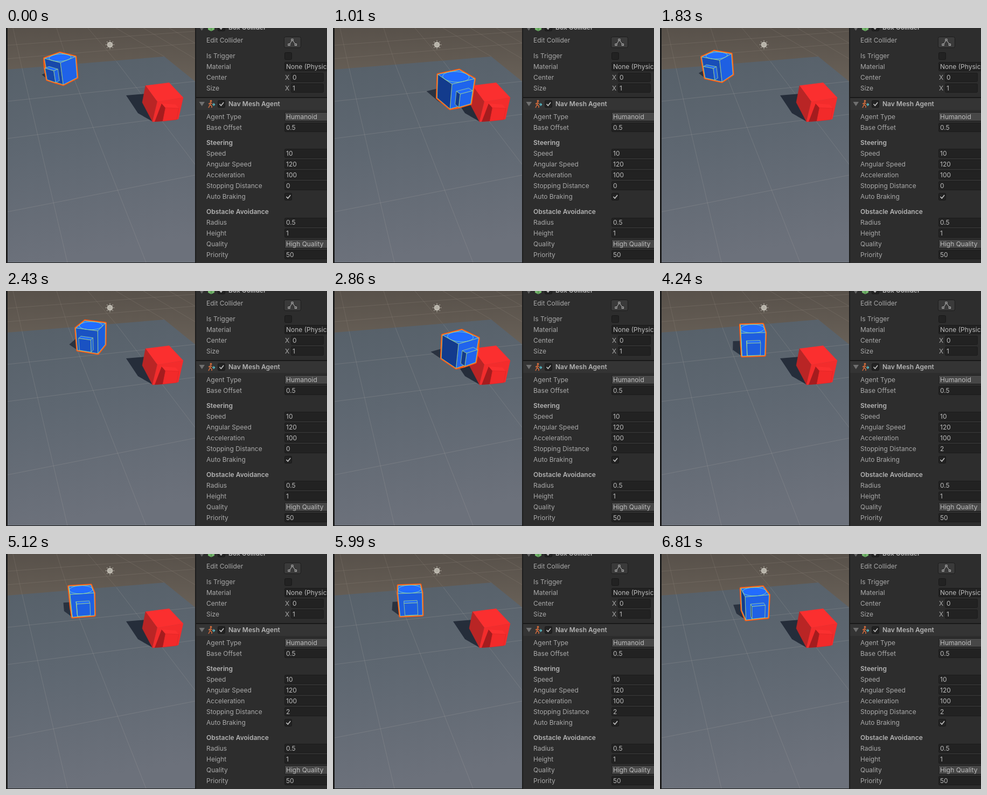
An HTML page that plays this animation: 596x436 px, repeating every 7270 ms.

```html
<!DOCTYPE html>
<html lang="en">
<head>
<meta charset="utf-8">
<title>Nav Mesh Agent stopping distance</title>
<style>
  html, body { margin: 0; width: 100%; height: 100%; overflow: hidden; background: #2d2d2d; }
  svg { display: block; width: 596px; height: 436px; }
  text { font: 12px Inter, sans-serif; fill: #a9a9a9; white-space: pre; }
  .bold { font-weight: 600; fill: #b4b4b4; }
  .value { fill: #bdbdbd; }
</style>
</head>
<body>
<svg viewBox="0 0 596 436" xmlns="http://www.w3.org/2000/svg">
  <defs>
    <linearGradient id="sky" x1="0" y1="0" x2="0" y2="1">
      <stop offset="0" stop-color="#58514a"/><stop offset="1" stop-color="#6a6259"/>
    </linearGradient>
    <linearGradient id="floor" x1="0" y1="0" x2=".15" y2="1">
      <stop offset="0" stop-color="#566069"/><stop offset=".45" stop-color="#5e6771"/>
      <stop offset="1" stop-color="#6c717b"/>
    </linearGradient>
    <clipPath id="view"><rect x="3" y="0" width="348" height="435"/></clipPath>
  </defs>

  <rect width="596" height="436" fill="#1d1d1d"/>
  <g clip-path="url(#view)">
    <rect x="3" width="348" height="110" fill="url(#sky)"/>
    <path d="M3 32L351 6M3 57L351 28M13 0L30 76M94 0L116 68M152 0L205 62M204 0L294 53M255 0L351 57M303 0L351 28"
          fill="none" stroke="#a39c90" stroke-opacity=".2"/>
    <path d="M3 77L294 53L351 99V435H3Z" fill="url(#floor)"/>
    <path d="M3 136L351 99M3 205L351 160M3 341L351 273M30 75L114 435M116 68L260 435M205 62L351 253"
          fill="none" stroke="#b4b0ac" stroke-opacity=".22"/>
    <g id="sun" stroke="#b0aca2" stroke-width="1.3">
      <circle cx="193" cy="31" r="4.600" fill="#b5b1a7" stroke="#d0ccc2"/>
    </g>
    <path d="M223 125L260 122L273 174L245 158Z" fill="#252d3a"/>
    <path id="shadow" fill="#2a323f"/>
    <g stroke-width=".5" stroke-linejoin="round">
      <path d="M259 107L303 101.500L329 129L281 137Z" fill="#fb2f2f" stroke="#fb2f2f"/>
      <path d="M259 107L281 137L272 174L253 138Z" fill="#b92525" stroke="#b92525"/>
      <path d="M281 137L329 129L320 169L272 174Z" fill="#f32c2c" stroke="#f32c2c"/>
      <path d="M289 140L296 148L291 173L276 174Z" fill="#a51c1e"/>
      <path d="M289 140L315 142L321 149L296 148Z" fill="#fb3030"/>
      <path d="M296 148L321 149L317 170L291 173Z" fill="#f22a2a" stroke="#d32424"/>
    </g>
    <path id="outline" fill="#ff5a14" stroke="#ff5a14" stroke-width="4.600" stroke-linejoin="round"/>
    <g id="agent" stroke="#a4d98e" stroke-width=".8" stroke-linejoin="round"></g>
    <path id="ring" fill="none" stroke="#8fe0b0" stroke-width=".8"/>
  </g>

  <rect x="353" width="243" height="436" fill="#2d2d2d"/>
  <g id="panel"></g>
</svg>

<script>
const $ = id => document.getElementById(id);
const rad = deg => deg * Math.PI / 180;

/* Inspector */
const rows = [];
const text = (x, y, s, cls = '') => rows.push(`<text class="${cls}" x="${x}" y="${y + 4.3}">${s}</text>`);
const rect = (x, y, w, h, fill, stroke = 'none', r = 2) =>
  rows.push(`<rect x="${x}" y="${y}" width="${w}" height="${h}" rx="${r}" fill="${fill}" stroke="${stroke}"/>`);
const path = (d, fill, stroke = 'none', w = 1) =>
  rows.push(`<path d="${d}" fill="${fill}" stroke="${stroke}" stroke-width="${w}"/>`);

function field(y, s, x = 517, w = 90, fill = '#222222') {
  rect(x + .5, y - 8.5, w - 1, 16, fill, '#1b1b1b');
  text(x + 3, y, s, 'value');
}
function checkbox(x, y, on) {
  rect(x + .5, y - 6.5, 13, 13, '#222222', '#181818');
  if (on) path(`M${x + 3.5} ${y}l2.8 3l4.8 -6`, 'none', '#c4c4c4', 1.6);
}
const label = (y, s) => text(372, y, s);

path('M358 -3h11l-5.5 8z', '#676767');
path('M375 -3L381 0L387 -3V3L381 6L375 3Z', '#74b56c');
path('M381 0V6', 'none', '#3f7a3b');
checkbox(393, -1, true);
text(413, -1, 'Box Collider', 'bold');

label(23, 'Edit Collider');
rect(516.5, 16.5, 31, 20, '#3a3a3a', '#1c1c1c', 3);
path('M526 31L531.5 22L538 31', 'none', '#b8b8b8');
for (const [x, y] of [[524, 29.5], [530, 20.5], [536.5, 29.5]]) rect(x, y, 3, 3, '#3a3a3a', '#b8b8b8', 0);
label(52, 'Is Trigger');
checkbox(517, 52, false);
label(72, 'Material');
field(72, 'None (Physic');
for (const [y, name, v] of [[92, 'Center', 0], [112, 'Size', 1]]) {
  label(y, name);
  text(518, y, 'X');
  field(y, v, 529, 61);
}

rect(353, 128, 243, 2, '#191919', 'none', 0);
rect(353, 130, 243, 22, '#343434', 'none', 0);
path('M358.5 137h10.5l-5.25 8z', '#707070');
rows.push('<circle cx="380.5" cy="135.5" r="1.9" fill="#cf6a3c"/>');
path('M380 138L379 142L382 144.5V148M379 142L376 148M376 141L380 138.5L383 141', 'none', '#cf6a3c', 1.6);
path('M383 142h4m-2 -2.5l2.5 2.5l-2.5 2.5', 'none', '#58b9c4', 1.4);
checkbox(393, 141, true);
text(413, 141, 'Nav Mesh Agent', 'bold');

const settings = [
  [165, 'Agent Type', 'Humanoid', 1], [185, 'Base Offset', '0.5'],
  [233, 'Speed', '10'], [253, 'Angular Speed', '120'], [273, 'Acceleration', '100'],
  [361, 'Radius', '0.5'], [381, 'Height', '1'], [401, 'Quality', 'High Quality', 1], [421, 'Priority', '50']
];
for (const [y, name, v, menu] of settings) {
  label(y, name);
  field(y, v, 517, 90, menu ? '#474747' : undefined);
}
text(372, 213, 'Steering', 'bold');
text(372, 341, 'Obstacle Avoidance', 'bold');
label(313, 'Auto Braking');
checkbox(517, 313, true);
rows.push('<text id="stopLabel" x="372" y="297.3">Stopping Distance</text>',
  '<rect id="stopBox" x="517.5" y="284.5" width="89" height="16" rx="2" fill="#222222"/>',
  '<text id="stopValue" class="value" x="520" y="297.3"></text>');
$('panel').innerHTML = rows.join('');

$('sun').innerHTML += Array.from({ length: 8 }, (_, i) => {
  const c = Math.cos(i * Math.PI / 4), s = Math.sin(i * Math.PI / 4);
  return `<path d="M${193 + 6.2 * c} ${31 + 6.2 * s}L${193 + 8.2 * c} ${31 + 8.2 * s}"/>`;
}).join('');

/* Camera: u is right, w is away from the viewer, y is up */
const F = 378, CX = 177, CY = 218, HIGH = 4.1;
const C = Math.cos(rad(41)), S = Math.sin(rad(41));
const SIDE = 1;

function project([u, w, y]) {
  const z = w * C + (HIGH - y) * S;
  return [CX + F * u / z, CY + F * ((HIGH - y) * C - w * S) / z];
}
function unproject(x, y, level) {
  const h = HIGH - level, z = h / (C * (y - CY) / F + S);
  return [(x - CX) / F * z, (z - h * S) / C];
}
const toPath = pts => 'M' + pts.map(p => p.map(v => v.toFixed(2)).join(' ')).join('L') + 'Z';

const cross = (a, b, c) => (b[0] - a[0]) * (c[1] - a[1]) - (b[1] - a[1]) * (c[0] - a[0]);
function hull(points) {
  const half = pts => {
    const out = [];
    for (const p of pts) {
      while (out.length > 1 && cross(out[out.length - 2], out[out.length - 1], p) <= 0) out.pop();
      out.push(p);
    }
    return out.slice(0, -1);
  };
  const sorted = [...points].sort((a, b) => a[0] - b[0] || a[1] - b[1]);
  return [...half(sorted), ...half(sorted.reverse())];
}

/* Corners of an upright box in the agent's own axes */
function box(place, half, z0, z1, y0, y1) {
  const ring = [[-half, z1], [half, z1], [half, z0], [-half, z0]];
  return [y0, y1].map(y => ring.map(([x, z]) => place(x, z, y)));
}
function shade(light) {
  return `rgb(${[34, 108, 255].map(v => Math.round(v * light)).join()})`;
}
function faces([low, high], yaw) {
  const lo = low.map(project), hi = high.map(project);
  const list = [[[hi[3], hi[2], hi[1], hi[0]], 1]];
  for (let k = 0; k < 4; k++) {
    const n = (k + 1) % 4, a = rad(yaw + 90 * k);
    const lit = Math.max(0, .6 * Math.sin(a) + .8 * Math.cos(a));
    list.push([[hi[k], hi[n], lo[n], lo[k]], .55 + .38 * lit]);
  }
  return list.filter(([q]) => cross(q[0], q[1], q[2]) > 0)
    .map(([q, light]) => `<path d="${toPath(q)}" fill="${shade(light)}"/>`).join('');
}

function drawAgent([x, y, yaw]) {
  const [u, w] = unproject(x, y, SIDE / 2);
  const c = Math.cos(rad(yaw)), s = Math.sin(rad(yaw)), h = SIDE / 2;
  const place = (px, pz, py) => [u + c * px + s * pz, w + s * px - c * pz, py];
  const body = box(place, h, -h, h, 0, SIDE);
  const nose = box(place, .28, h, h + .25, .14, .68);

  const cast = body.flat().map(([a, b, t]) => project([a - .45 * t, b + .62 * t, 0]));
  $('shadow').setAttribute('d', toPath(hull(cast)));
  $('outline').setAttribute('d', toPath(hull([...body.flat(), ...nose.flat()].map(project))));
  $('agent').innerHTML = faces(body, yaw) + faces(nose, yaw);
  const circle = Array.from({ length: 28 }, (_, i) => {
    const a = i * Math.PI / 14;
    return project(place(h * Math.cos(a), h * Math.sin(a), SIDE));
  });
  $('ring').setAttribute('d', toPath(circle));
}

/* Moves: first change, last change, steps, [x, y, yaw] reached */
const LOOP = 7270, CUT = 3220;
const home = [103, 75, -35];
const moves = [
  [460, 1010, 9, [226, 113, 28]],
  [1410, 1960, 9, [100, 68, -42]],
  [2230, 2860, 10, [234, 107, 33]],
  [CUT, CUT, 1, [88, 66, -36]],
  [3480, 3910, 7, [177, 92, 8]],
  [4240, 4520, 5, [110, 78, -10]],
  [4980, 5320, 6, [178, 98, 30]],
  [5850, 6130, 5, [121, 78, -10]],
  [6540, 6810, 5, [175.5, 91, 13]]
];

function poseAt(t) {
  let from = home;
  for (const [start, end, steps, to] of moves) {
    if (t < start) break;
    if (t < end) {
      const p = (Math.floor((t - start) * (steps - 1) / (end - start) + .02) + 1) / steps;
      const q = Math.min(1, p) ** (steps > 6 ? .65 : 1.1);
      const e = q * q * (3 - 2 * q);
      return from.map((v, i) => v + (to[i] - v) * (i < 2 ? e : p));
    }
    from = to;
  }
  return from;
}

function render(t) {
  drawAgent(poseAt(t));
  const focused = t >= CUT && t < 3480;
  $('stopValue').textContent = t < CUT ? '0' : '2';
  $('stopLabel').style.fill = focused ? '#7ba9ec' : '';
  $('stopBox').setAttribute('stroke', focused ? '#3a79bb' : '#1b1b1b');
}

const began = performance.now();
function tick() {
  render((performance.now() - began) % LOOP);
  requestAnimationFrame(tick);
}
tick();
</script>
</body>
</html>
```
